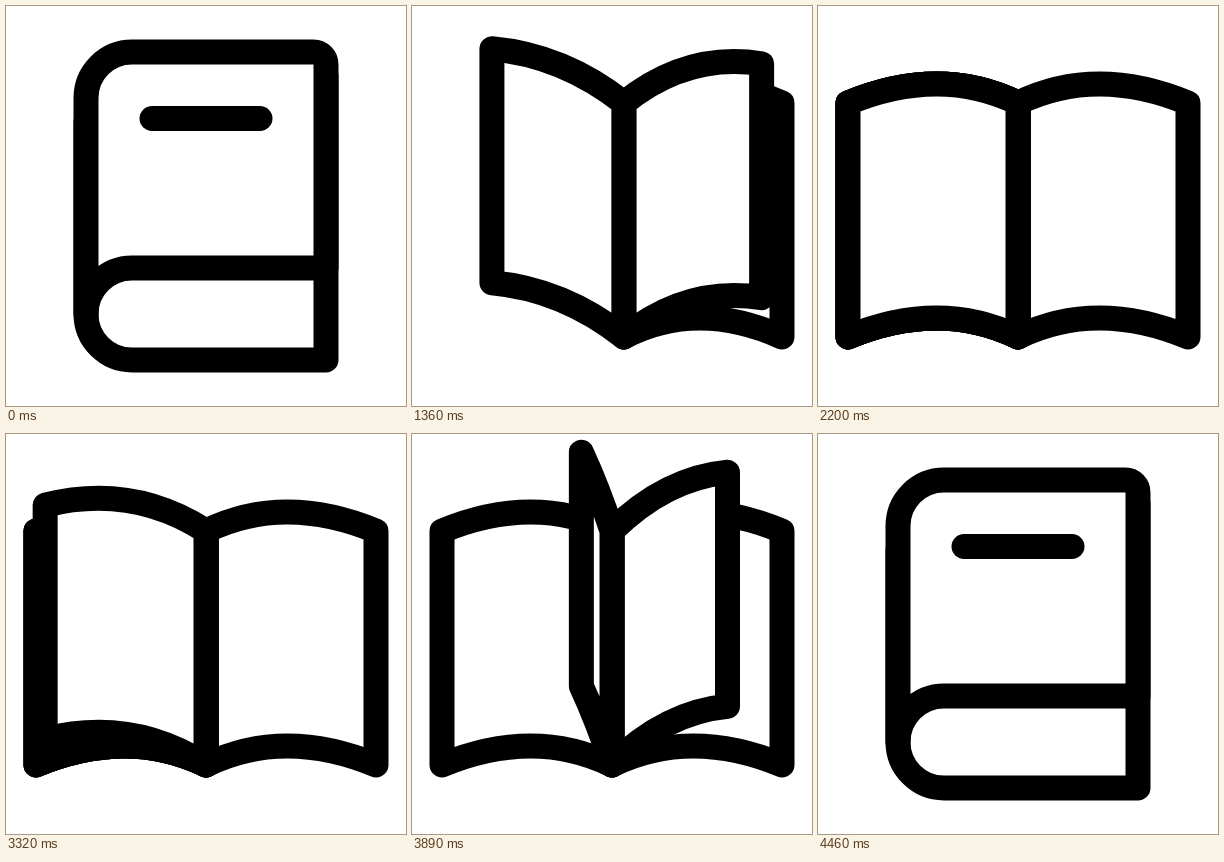
Write an HTML page that moves like this. It is 400 px wide and 400 px high and loops after 4.52 s.

```html
<!DOCTYPE html>
<html lang="en">
<head>
<meta charset="utf-8">
<title>Book opening and closing</title>
<style>
  html, body { margin: 0; height: 100%; overflow: hidden; background: #fff; }
  svg { display: block; width: 100%; height: 100%; }
  path { fill: #fff; stroke: #000; stroke-width: 25; stroke-linecap: round; stroke-linejoin: round; }
</style>
</head>
<body>
<svg viewBox="0 0 400 400"><g id="book"></g></svg>
<script>
const LOOP = 4520, STEP = 30, OPEN_AT = 1000, CLOSE_AT = 3320, CLOSED_AT = 4460;
const TURN = 1200, COVER_TIME = 515, PAGE_TIME = 572, PAGE_STARTS = [251, 420, 628];
const COVER_LIFT = 86, PAGE_LIFT = 80, BULGE = 38;
const CREST = 0.46; // where a leaf bends, as a share of its width from the spine

const book = document.getElementById('book');
const clamp = x => Math.min(1, Math.max(0, x));
const mix = (a, b, k) => a + (b - a) * k;
const smooth = x => { x = clamp(x); return x * x * (3 - 2 * x); };
const path = d => `<path d="${d}"/>`;
const arc = (r, x, y, sweep) => r > 0.1 ? `A${r} ${r} 0 0 ${sweep} ${x} ${y}` : `L${x} ${y}`;

// Progress through the opening in ms; closing runs it backwards.
function progress(t) {
  if (t < CLOSE_AT) {
    return Math.min(TURN, Math.max(0, Math.floor((t - OPEN_AT) / STEP) * STEP));
  }
  return Math.max(0, Math.ceil((CLOSED_AT - t) / STEP) * STEP);
}

// A leaf hinged at the spine, its free edge raised by the turn.
function leaf({ spine, edge, top, bottom, lift, bulge, round = 0, corner = 0 }) {
  const start = spine + round, bend = mix(start, edge, CREST);
  const rise = lift * CREST + bulge;
  return path(`M${spine} ${bottom + round}L${spine} ${top + round}` +
    arc(round, start, top, 1) +
    `Q${bend} ${top - rise} ${edge - corner} ${top - lift}` +
    arc(corner, edge, top - lift + corner, 1) +
    `L${edge} ${bottom - lift}` +
    `Q${bend} ${bottom - rise} ${start} ${bottom}` +
    arc(round, spine, bottom + round, 0));
}

function draw(u) {
  const m = smooth(u / 300);
  const spine = u < 270 ? mix(80, 216, smooth(u / 270)) : mix(216, 200, smooth((u - 270) / 270));
  const right = mix(320, 370, smooth(u / 200));
  const round = 46 * (1 - m), bulge = BULGE * m;

  const backTop = mix(70, 97, m), backBottom = mix(354, 331, m);
  const start = spine + round, bend = mix(start, right, CREST);
  const back = path(`M${spine} ${backTop + round}L${start} ${backTop}` +
    `Q${bend} ${backTop - bulge} ${right} ${backTop}` +
    `V${backBottom}Q${bend} ${backBottom - bulge} ${start} ${backBottom}` +
    arc(round, spine, backBottom - round, 1) + 'Z');

  const turn = Math.PI * smooth(u / COVER_TIME), facing = Math.cos(turn);
  const reach = facing * mix(240, 170, smooth(u / 150));
  const top = mix(46, 97, m), lift = COVER_LIFT * Math.sin(turn);
  let cover = leaf({
    spine, edge: spine + reach, top, bottom: mix(262, 331, m), lift,
    bulge: bulge * facing * facing, round, corner: 12.5 * (1 - m)
  });
  if (facing > 0) {
    const point = k => `${spine + reach * k} ${top + 66.5 - lift * k}`;
    cover += path(`M${point(0.275)}L${point(0.725)}`);
  }

  const leaves = [{ facing, shape: cover }];
  for (const begin of PAGE_STARTS) {
    if (u <= begin) continue;
    // A page turns steadily after a soft start.
    const k = clamp((u - begin) / PAGE_TIME), angle = Math.PI * k * smooth(k * 4);
    const c = Math.cos(angle);
    leaves.push({
      facing: c,
      shape: leaf({
        spine, edge: spine + c * (c > 0 ? right - spine : 170), top: 97, bottom: 331,
        lift: PAGE_LIFT * Math.sin(angle), bulge: BULGE * Math.abs(c)
      })
    });
  }

  // Earlier leaves lie on top at the right and underneath at the left.
  const onRight = leaves.filter(l => l.facing >= 0).reverse();
  const onLeft = leaves.filter(l => l.facing < 0);
  book.innerHTML = back + [...onRight, ...onLeft].map(l => l.shape).join('');
}

let shown = -1;
const origin = performance.now();
function tick() {
  const u = progress((performance.now() - origin) % LOOP);
  if (u !== shown) draw(shown = u);
  requestAnimationFrame(tick);
}
tick();
</script>
</body>
</html>
```
